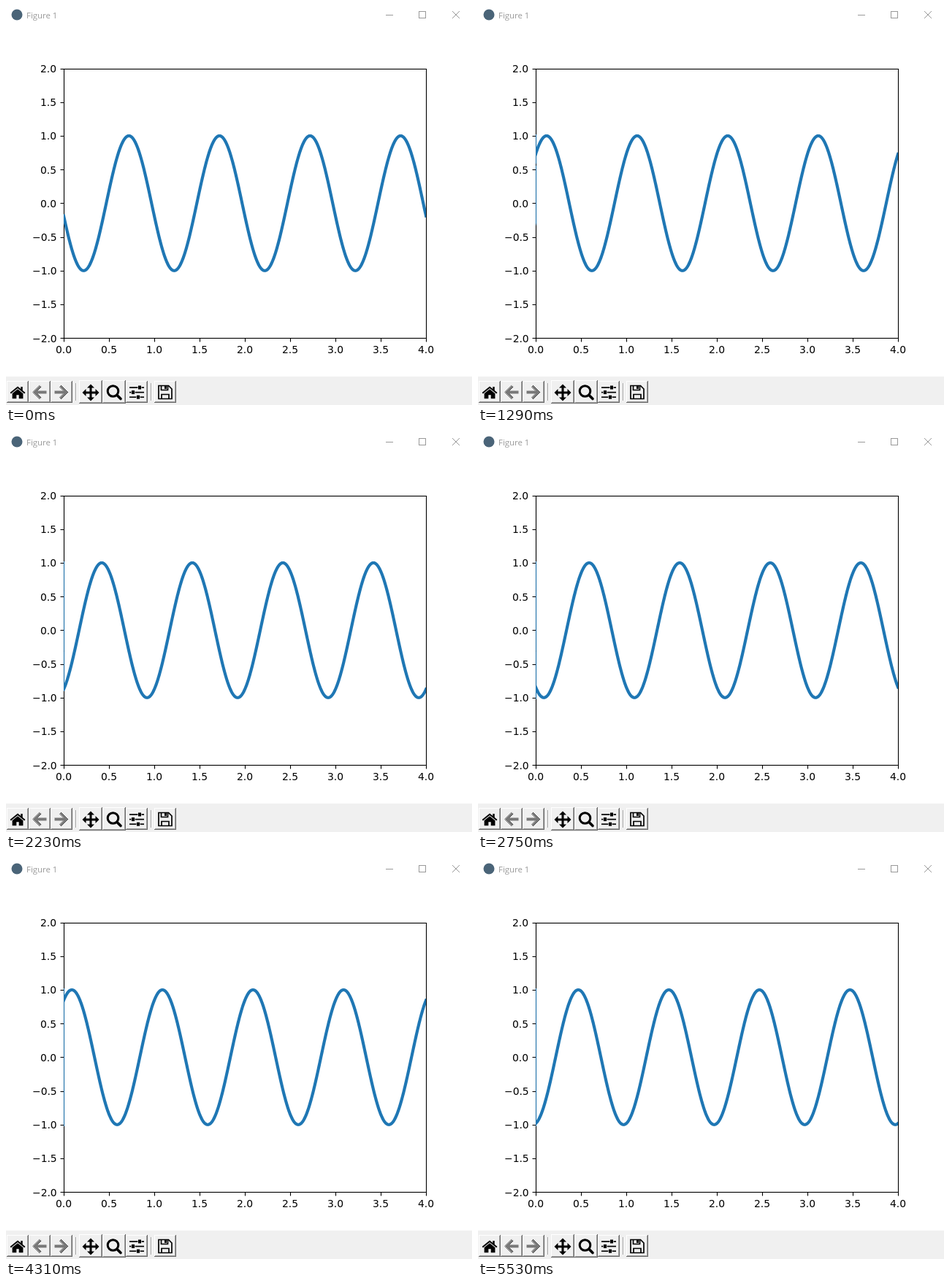
An HTML page with a canvas for the animation above (5.59 s loop, 638 px wide and 547 px high).

```html
<!DOCTYPE html>
<html lang="en">
<head>
<meta charset="utf-8">
<title>Travelling sine wave</title>
<style>
html, body { margin: 0; width: 100%; height: 100%; overflow: hidden; background: #fff; }
canvas { display: block; }
</style>
</head>
<body>
<canvas id="stage" width="638" height="547"></canvas>
<script>
const W = 638, H = 547, LOOP = 5590, LAST = 82;
const ctx = document.getElementById('stage').getContext('2d');
const AXES = { left: 79, right: 575, top: 86, bottom: 455 };
const UNIT_X = 124, UNIT_Y = 92.4, MID_Y = 270.4;
const FACE = '#f0f0f0', SHADE = '#a0a0a0', INK = '#000', CHROME = '#999';

// Steps hold 60 ms, and three in every eight hold 20 ms longer.
function stepStart(k) {
  const n = k - 1;
  return k === 0 ? 0 : 70 + 60 * n + 20 * Math.max(0, Math.floor((3 * n - 1) / 8));
}

// Phase shift in whole hundredths of a period.
const stepPhase = k => (47 + Math.floor(2.14 * k + 0.1)) / 100;

function makeLayer(w, h) {
  const c = document.createElement('canvas');
  c.width = w;
  c.height = h;
  return c;
}

function rect(g, color, x, y, w, h) {
  g.fillStyle = color;
  g.fillRect(x, y, w, h);
}

function trace(g, pts, close) {
  g.beginPath();
  pts.forEach(([x, y], i) => i ? g.lineTo(x, y) : g.moveTo(x, y));
  if (close) g.closePath();
}

function line(g, color, width, ...pts) {
  trace(g, pts);
  g.strokeStyle = color;
  g.lineWidth = width;
  g.stroke();
}

function poly(g, color, ...pts) {
  trace(g, pts, true);
  g.fillStyle = color;
  g.fill();
}

function drawTitleBar(g) {
  g.fillStyle = '#4a6478';
  g.beginPath();
  g.arc(15, 12, 7.5, 0, Math.PI * 2);
  g.fill();

  g.font = '11.4px "Open Sans", "Noto Sans", sans-serif';
  g.fillStyle = CHROME;
  g.fillText('Figure 1', 28, 17);

  line(g, CHROME, 1, [520, 12.5], [530, 12.5]);
  g.strokeRect(565.5, 7.5, 9, 9);
  line(g, CHROME, 1, [611, 7], [621, 17]);
  line(g, CHROME, 1, [621, 7], [611, 17]);
}

// Places a tick label on whole pixels; align is the share of its width left of x.
function drawLabel(g, value, x, y, align) {
  const text = value.toFixed(1).replace('-', '\u2212');
  g.fillStyle = INK;
  g.fillText(text, Math.round(x - g.measureText(text).width * align), y);
}

function drawAxes(g) {
  const { left, right, top, bottom } = AXES;
  g.strokeStyle = INK;
  g.lineWidth = 1.11;
  g.strokeRect(left + 0.5, top + 0.5, right - left, bottom - top);

  g.font = '13.89px "DejaVu Sans", sans-serif';
  for (let i = 0; i <= 8; i++) {
    const x = left + 62 * i;
    const y = Math.round(85.6 + 46.2 * i) + 0.5;
    line(g, INK, 1.11, [x + 0.5, bottom + 0.5], [x + 0.5, bottom + 5.5]);
    line(g, INK, 1.11, [left + 0.5, y], [left - 4.5, y]);
    drawLabel(g, i / 2, x, 476, 0.5);
    drawLabel(g, 2 - i / 2, 69.3, Math.round(91 + 46.2 * i), 1);
  }
}

// Raised square button whose top left corner is (x, y).
function drawButton(g, x, y, size) {
  rect(g, '#696969', x, y, size, size);
  rect(g, '#fff', x, y, size - 1, size - 1);
  rect(g, SHADE, x + 1, y + 1, size - 2, size - 2);
  rect(g, FACE, x + 1, y + 1, size - 3, size - 3);
}

function drawSeparator(g, x) {
  rect(g, SHADE, x, 517, 1, 24);
  rect(g, '#fff', x + 1, 517, 1, 24);
}

function makeStipple(g) {
  const tile = makeLayer(2, 2);
  const t = tile.getContext('2d');
  rect(t, INK, 1, 0, 1, 1);
  rect(t, INK, 0, 1, 1, 1);
  return g.createPattern(tile, 'repeat');
}

function drawHome(g) {
  line(g, INK, 2.1, [6.2, 530.8], [16, 522.8], [25.8, 530.8]);
  rect(g, INK, 20.2, 522, 2.5, 5);
  poly(g, INK, [16, 525.2], [23.4, 531.2], [23.4, 538.2], [17.7, 538.2],
    [17.7, 533.3], [14.3, 533.3], [14.3, 538.2], [8.6, 538.2], [8.6, 531.2]);
}

function drawArrow(g, cx, dir, ink) {
  const y = 529.5, tip = cx - dir * 7, wing = cx + dir * 1.5;
  line(g, ink, 3.7, [wing, y - 8.5], [tip, y], [wing, y + 8.5]);
  line(g, ink, 4, [tip, y], [cx + dir * 9.5, y]);
}

function drawPan(g) {
  g.save();
  g.translate(116, 530);
  for (let i = 0; i < 4; i++) {
    line(g, INK, 3, [0, 0], [0, -8]);
    poly(g, INK, [0, -11.5], [5, -6.5], [-5, -6.5]);
    g.rotate(Math.PI / 2);
  }
  g.restore();
}

function drawZoom(g) {
  g.strokeStyle = INK;
  g.lineWidth = 3;
  g.beginPath();
  g.arc(146.5, 528, 7.3, 0, Math.PI * 2);
  g.stroke();
  g.lineCap = 'round';
  line(g, INK, 3.6, [152, 533.5], [157, 538.5]);
  g.lineCap = 'butt';
}

function drawSliders(g) {
  [183, 174, 181].forEach((knob, i) => {
    const y = 522.2 + 6.6 * i;
    rect(g, INK, 169, y, 20, 1.7);
    rect(g, FACE, knob - 2.7, y, 5.4, 1.7);
    rect(g, INK, knob - 2, y - 1.7, 4, 5);
  });
}

function drawSave(g) {
  trace(g, [[209, 520.5], [222.5, 520.5], [227, 525], [227, 538.5], [209, 538.5]], true);
  g.strokeStyle = INK;
  g.lineWidth = 1.7;
  g.stroke();
  line(g, INK, 1.7, [212.5, 520.5], [212.5, 526.5], [221.5, 526.5], [221.5, 520.5]);
  rect(g, INK, 217, 521, 3, 4);
  line(g, INK, 1.7, [213, 538.5], [213, 532.5], [223, 532.5], [223, 538.5]);
}

function drawToolbar(g) {
  rect(g, FACE, 0, 508, W, H - 508);
  [1, 31, 61, 164, 203].forEach(x => drawButton(g, x, 514, 30));
  [100, 132].forEach(x => drawButton(g, x, 513, 32));
  [95, 198].forEach(x => drawSeparator(g, x));

  const stipple = makeStipple(g);
  drawHome(g);
  drawArrow(g, 46, 1, stipple);
  drawArrow(g, 76, -1, stipple);
  drawPan(g);
  drawZoom(g);
  drawSliders(g);
  drawSave(g);
}

// Draws the sine from the left spine on, cut off after the given width.
function drawWave(g, phase, width) {
  const { left, top, bottom } = AXES;
  const end = Math.min(4, width / UNIT_X + 0.1);
  g.save();
  g.beginPath();
  g.rect(left, top, width, bottom - top);
  g.clip();
  g.beginPath();
  for (let x = 0; x < end + 0.002; x += 0.004) {
    const y = Math.sin(2 * Math.PI * (x - phase));
    g.lineTo(left + x * UNIT_X, MID_Y - y * UNIT_Y);
  }
  g.strokeStyle = '#1f77b4';
  g.lineWidth = 4.17;
  g.lineJoin = 'round';
  g.lineCap = 'square';
  g.stroke();
  g.restore();
}

const backdrop = makeLayer(W, H);
const back = backdrop.getContext('2d');
rect(back, '#fff', 0, 0, W, H);
drawTitleBar(back);
drawAxes(back);
drawToolbar(back);

function render(time) {
  let step = 0;
  while (step < LAST && stepStart(step + 1) <= time) step++;
  ctx.drawImage(backdrop, 0, 0);
  // Earlier steps leave their colour on the spine's pixel column.
  for (let k = 0; k < step; k++) drawWave(ctx, stepPhase(k), 1);
  drawWave(ctx, stepPhase(step), AXES.right - AXES.left);
}

const origin = performance.now();
function tick() {
  render((performance.now() - origin) % LOOP);
  requestAnimationFrame(tick);
}
tick();
</script>
</body>
</html>
```
